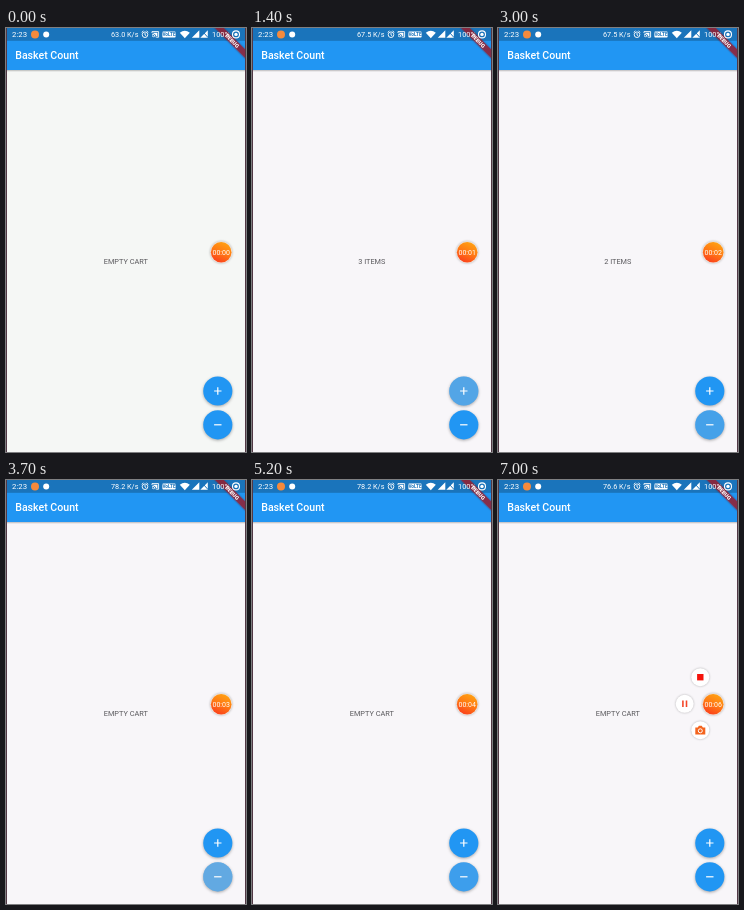
An HTML page that plays this animation: 240x424 px, repeating every 7.1 s.

```html
<!DOCTYPE html>
<html lang="en">
<head>
<meta charset="utf-8">
<title>Basket Count</title>
<style>
  html, body { margin: 0; width: 100%; height: 100%; overflow: hidden; background: #f8f6f9; }
  svg { display: block; width: 100vw; height: 100vh; }
  text { font-family: Roboto, sans-serif; fill: #fff; }
  .middle { text-anchor: middle; }
  .shadow { filter: drop-shadow(.8px 1.8px 1.6px rgba(0, 0, 0, .32)); }
  .soft { filter: drop-shadow(0 .6px 1px rgba(0, 0, 0, .28)); }
</style>
</head>
<body>
<svg viewBox="0 0 240 424">
  <defs>
    <linearGradient id="barShadow" x2="0" y2="1">
      <stop stop-color="#000" stop-opacity=".25"/>
      <stop offset="1" stop-color="#000" stop-opacity="0"/>
    </linearGradient>
    <linearGradient id="orange" x1=".75" x2=".3" y2="1">
      <stop stop-color="#ffa412"/>
      <stop offset=".5" stop-color="#ff7a14"/>
      <stop offset="1" stop-color="#fb3f1c"/>
    </linearGradient>
  </defs>

  <rect id="page" width="240" height="424"/>

  <!-- App bar -->
  <rect y="42" width="240" height="2" fill="url(#barShadow)"/>
  <rect width="240" height="42" fill="#2196f3"/>
  <rect width="240" height="12.8" fill="#1a74bb"/>
  <text x="9.2" y="31.2" font-size="10.6" font-weight="500">Basket Count</text>

  <!-- Debug ribbon -->
  <g transform="translate(239 0) rotate(45)">
    <rect class="soft" x="-22" y="14.9" width="44" height="6.4" fill="#a01c2c" fill-opacity=".8"/>
    <text class="middle" y="20" font-size="5.4" font-weight="900">DEBUG</text>
  </g>

  <!-- Status bar -->
  <text x="6" y="9.2" font-size="7.8">2:23</text>
  <circle cx="29" cy="6.4" r="4" fill="#f58a3c"/>
  <circle cx="40.2" cy="6.4" r="3" fill="#fff"/>
  <text id="speed" x="105" y="9.2" font-size="7.3"></text>
  <g fill="none" stroke="#fff" stroke-width=".9">
    <circle cx="139" cy="6.7" r="2.8"/>
    <path d="M139 5v2l1.3.8M135.7 4.4l1.7-1.5M142.3 4.4l-1.7-1.5"/>
    <path d="M146 5V3.6h6.6v5.6h-2.4M146 6.1a3.1 3.1 0 0 1 3.1 3.1M146 7.8a1.4 1.4 0 0 1 1.4 1.4"/>
    <circle cx="230" cy="6.4" r="3.5" stroke-width="1.1"/>
  </g>
  <path d="M147.2 4.8h4.2v3.4h-1.2q-.6-2.2-3-2.6z" fill="#fff"/>
  <rect x="156.4" y="3.6" width="13.2" height="6" rx=".8" fill="#fff"/>
  <text class="middle" x="163" y="8.3" font-size="4.7" font-weight="700" style="fill:#1a74bb">VoLTE</text>
  <g fill="#fff">
    <path d="M173.8 4.7q5-3.8 10 0l-5 5.5z"/>
    <path d="M185.8 9.8h7.5V2.3zM194.3 9.8h7.5V2.3z"/>
    <circle cx="230" cy="6.4" r="1.7"/>
  </g>
  <path d="M197.5 4.5l4.5 5" stroke="#1a74bb"/>
  <text x="206" y="9.2" font-size="7.4">100%</text>

  <text id="cart" class="middle" x="119.8" y="235.6" font-size="7.35" style="fill:#58575b"></text>

  <!-- Cart buttons -->
  <g transform="translate(211.8 363)">
    <circle class="shadow" r="14.6" fill="#2196f3"/>
    <circle id="plusGlow" r="14.6" fill="#c8c8c8"/>
    <path d="M-3.7 0h7.4M0-3.7v7.4" stroke="#fff" stroke-width="1.2"/>
  </g>
  <g transform="translate(211.8 396.8)">
    <circle class="shadow" r="14.6" fill="#2196f3"/>
    <circle id="minusGlow" r="14.6" fill="#c8c8c8"/>
    <path d="M-3.7 0h7.4" stroke="#fff" stroke-width="1.2"/>
  </g>

  <!-- Recorder bubble and its menu -->
  <g id="stop">
    <circle class="soft" r="9" fill="#fff"/>
    <rect x="-3.2" y="-3.2" width="6.4" height="6.4" fill="#f5140c"/>
  </g>
  <g id="pause">
    <circle class="soft" r="9" fill="#fff"/>
    <path d="M-1.8-3.3v6.6M1.8-3.3v6.6" stroke="#f4472a" stroke-width="1.6"/>
  </g>
  <g id="camera">
    <circle class="soft" r="9" fill="#fff"/>
    <path d="M-5-2.8h2.4l1.2-1.6h2.8l1.2 1.6H5v7H-5z" fill="#f4641e"/>
    <circle cy=".6" r="2" fill="#f4641e" stroke="#fff" stroke-width="1"/>
  </g>
  <circle class="soft" cx="215.2" cy="224.2" r="11" fill="#efe3da"/>
  <circle cx="215.2" cy="224.2" r="10.3" fill="url(#orange)"/>
  <text id="timer" class="middle" x="215.2" y="226.7" font-size="7"></text>

  <!-- Dark side edges of the recording -->
  <path d="M.5 0v424M239.5 0v424" stroke="#513845"/>
</svg>

<script>
const LOOP = 7100;
const TAP_DELAY = 100;
const MENU_OPENS = 6200;
const BUBBLE = [215.2, 224.2];
const plusTaps = [250, 750, 1150, 1500, 1850];
const minusTaps = [2250, 2500, 2710, 3100, 3500, 5150];
const speeds = [[0, '63.0'], [400, '67.5'], [3400, '78.2'], [6400, '76.6']];
const menu = { stop: [202.3, 197.2], pause: [186.7, 223.8], camera: [202.3, 250.2] };

const el = id => document.getElementById(id);
const clamp = x => Math.max(0, Math.min(1, x));
const easeOut = x => 1 - (1 - x) ** 3;
const countTaps = (taps, t) => taps.filter(tap => t >= tap + TAP_DELAY).length;

// A tapped button lights up quickly, then fades back.
function drawGlow(id, taps, t) {
  const last = taps.filter(tap => tap <= t).pop() ?? -Infinity;
  const age = t - last;
  el(id).setAttribute('opacity', 0.4 * clamp(age / 120) * clamp((400 - age) / 200));
}

function drawMenu(t) {
  const open = easeOut(clamp((t - MENU_OPENS) / 300));
  for (const [id, target] of Object.entries(menu)) {
    const [x, y] = target.map((end, i) => BUBBLE[i] + (end - BUBBLE[i]) * open);
    el(id).setAttribute('transform', `translate(${x} ${y})`);
    el(id).setAttribute('visibility', open > 0 ? 'visible' : 'hidden');
  }
}

function draw(t) {
  const items = Math.max(0, countTaps(plusTaps, t) - countTaps(minusTaps, t));
  el('cart').textContent = items === 0 ? 'EMPTY CART' : items === 1 ? '1 ITEM' : `${items} ITEMS`;
  el('speed').textContent = speeds.filter(([start]) => start <= t).pop()[1] + ' K/s';
  el('timer').textContent = '00:0' + Math.max(0, Math.floor((t - 300) / 1000));
  el('page').setAttribute('fill', t < 100 ? '#f5f7f5' : '#f8f6f9');
  drawGlow('plusGlow', plusTaps, t);
  drawGlow('minusGlow', minusTaps, t);
  drawMenu(t);
}

const start = performance.now();
function frame() {
  draw((performance.now() - start) % LOOP);
  requestAnimationFrame(frame);
}
frame();
</script>
</body>
</html>
```
